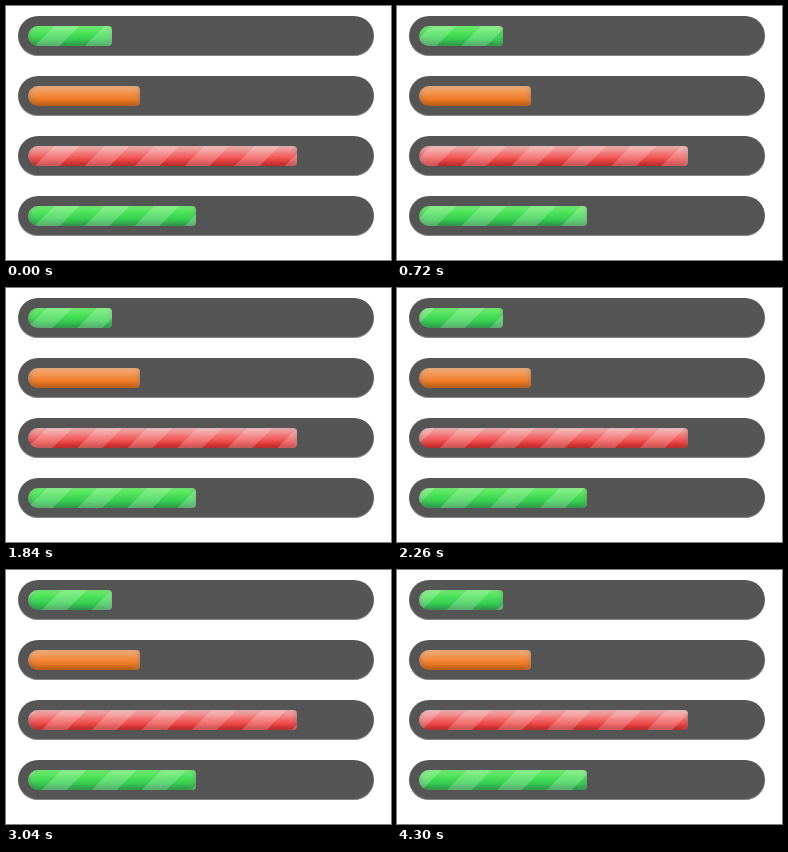
Write an HTML page that moves like this. It is 385x254 px and loops after 4.4 s.

```html
<!DOCTYPE html>
<html lang="en">
<head>
<meta charset="utf-8">
<title>Progress bars</title>
<style>
html, body { margin: 0; width: 100%; height: 100%; overflow: hidden; background: #fff; }
.meter {
  position: absolute; left: 12px; width: 336px; height: 20px; padding: 10px;
  border-radius: 25px; background: #555;
  box-shadow: inset 0 -1px 1px rgba(255, 255, 255, .3);
}
.meter span {
  display: block; position: relative; height: 100%; overflow: hidden;
  border-radius: 20px 8px 8px 20px;
  background: linear-gradient(rgb(84, 240, 84), rgb(43, 194, 83));
  box-shadow: inset 0 2px 9px rgba(255, 255, 255, .3), inset 0 -2px 6px rgba(0, 0, 0, .4);
}
.meter.orange span { background: linear-gradient(#f1a165, #f36d0a); }
.meter.red span { background: linear-gradient(#f0a3a3, #f42323); }
.striped span::after {
  content: ""; position: absolute; inset: 0;
  --light: rgba(255, 255, 255, .2);
  background: linear-gradient(135deg, var(--light) 25%, transparent 25% 50%,
    var(--light) 50% 75%, transparent 75%) var(--shift, 0) 0 / 50px 50px;
}
</style>
</head>
<body>
<div class="meter striped" style="top:10px"><span style="width:25%"></span></div>
<div class="meter orange" style="top:70px"><span style="width:33.3%"></span></div>
<div class="meter red striped" style="top:130px"><span style="width:80%"></span></div>
<div class="meter striped" style="top:190px"><span style="width:50%"></span></div>
<script>
const LOOP = 4400;           // ms
const STEPS = 32;            // jumps per loop
const STRIPE = 50;           // px between stripes
const STEPS_PER_STRIPE = 7;
const FIRST_SHIFT = 27;

const start = performance.now();
function draw() {
  const progress = (performance.now() - start) % LOOP / LOOP;
  const step = Math.floor(progress * STEPS);
  const shift = (FIRST_SHIFT + step * STRIPE / STEPS_PER_STRIPE) % STRIPE;
  document.body.style.setProperty('--shift', shift + 'px');
  requestAnimationFrame(draw);
}
draw();
</script>
</body>
</html>
```
